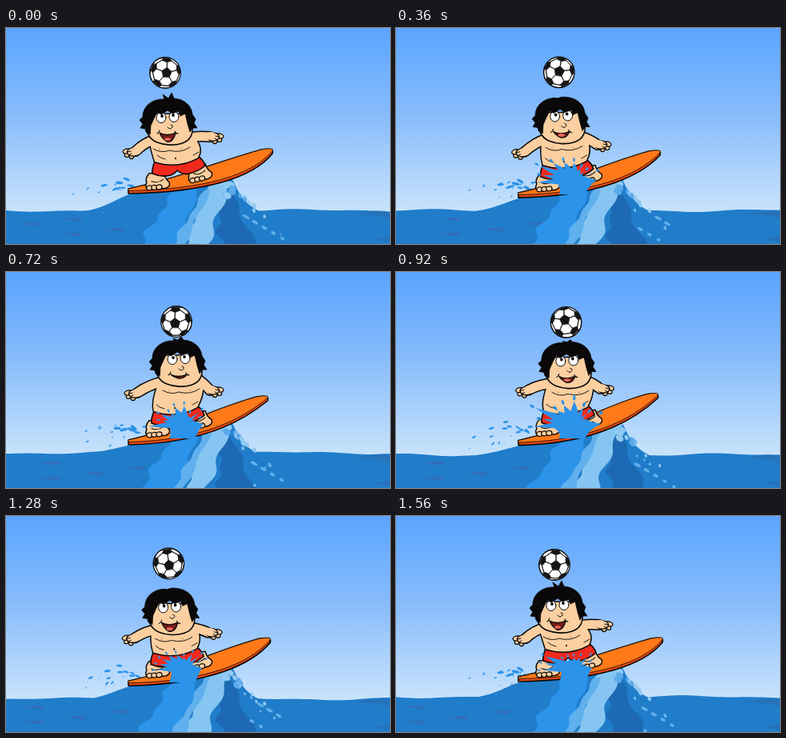
These frames come from a looping animation (480x270 px, 1.6 s). An HTML page with a canvas:

```html
<!DOCTYPE html>
<html lang="en">
<head>
<meta charset="utf-8">
<title>Surfing header</title>
<style>
html, body { margin: 0; width: 100%; height: 100%; overflow: hidden; }
canvas { display: block; }
</style>
</head>
<body>
<canvas width="480" height="270"></canvas>
<script>
const ctx = document.querySelector('canvas').getContext('2d');
const LOOP = 1600, STEP = 40, TAU = Math.PI * 2;
const SKIN = '#fbcfa0', INK = '#0a0808', SEA = '#207dca', WATER = '#2b93ea', FOAM = '#86c5f2', DEEP = '#1d69b3';
const { sin, cos, floor, hypot } = Math;

// Tracks: values at key times, joined by periodic Hermite curves.
const poseTimes = [0, 200, 520, 720, 1120, 1400, 1560];
const ballTimes = [0, 90, 200, 240, 400, 520, 640, 720, 840, 980, 1120, 1190, 1360, 1400, 1460, 1560];
const ballX = [199, 199, 199, 200, 205, 208, 211, 213, 213, 212, 209, 207, 200, 199, 198, 198];
const ballY = [56, 46.5, 66, 70, 52, 57, 68, 62, 54, 68, 53, 49, 70, 71, 71, 61];
const pose = {
  headX: [204, 203, 212, 216, 212, 203, 204],
  headY: [115, 114, 113, 112, 117, 117, 115],
  lookX: [-1, -1, 2, 1, -1, -1, -1],
  tuft: [6, 0, 0, 3, 0, 0, 6],
  mouth: [9, 10, 1, 3, 8, 9, 9],
  handLX: [159, 156, 160, 161, 163, 155, 159],
  handLY: [155, 158, 153, 152, 147, 158, 154],
  handRX: [259, 256, 257, 259, 259, 256, 258],
  handRY: [136, 146, 145, 148, 144, 146, 136],
  hipX: [217, 215, 215, 216, 216, 215, 218],
  hipY: [173, 177, 177, 180, 178, 175, 172],
  footY: [194, 194, 198, 198, 195, 193, 193],
  tailY: [203, 205, 211, 212, 212, 205, 203],
  noseX: [333, 333, 327, 327, 328, 332, 333],
  noseY: [152, 155, 153, 156, 150, 156, 153],
  boardW: [1, 1, .6, .45, .8, 1, 1],
  sea: [228, 231, 225, 226, 230, 227, 226],
  splash: [0, 1, .4, .65, 1, .3, .6]
};

function track(times, values, t) {
  const n = times.length;
  const T = k => times[(k + n) % n] + LOOP * floor(k / n);
  const V = k => values[(k + n) % n];
  const slope = k => (V(k + 1) - V(k - 1)) / (T(k + 1) - T(k - 1));
  let i = n - 1;
  while (times[i] > t) i--;
  const d = T(i + 1) - T(i), u = (t - T(i)) / d, s = u * u * (3 - 2 * u);
  return V(i) * (1 - s) + V(i + 1) * s + d * u * (1 - u) * (slope(i) * (1 - u) - slope(i + 1) * u);
}

const rand = n => { const v = sin(n * 127.1 + 3.7) * 43758.5453; return v - floor(v); };

function shape(d, fill, line = 0) {
  const p = new Path2D(d);
  if (fill) { ctx.fillStyle = fill; ctx.fill(p); }
  if (line) { ctx.strokeStyle = INK; ctx.lineWidth = line; ctx.stroke(p); }
}

function oval(x, y, rx, ry, fill, line = 0, turn = 0) {
  ctx.beginPath();
  ctx.ellipse(x, y, rx, ry, turn, 0, TAU);
  ctx.fillStyle = fill;
  ctx.fill();
  if (line) { ctx.strokeStyle = INK; ctx.lineWidth = line; ctx.stroke(); }
}

function limb(d, width, color) {
  ctx.strokeStyle = color;
  ctx.lineWidth = width;
  ctx.stroke(new Path2D(d));
}

function at(x, y, draw) {
  ctx.save();
  ctx.translate(x, y);
  draw();
  ctx.restore();
}

// Ragged band of water running down from (x0, y0) to the bottom edge.
function stream(x0, y0, x1, w0, w1, rag, turns, color, t) {
  const left = [], right = [];
  for (let y = y0; y <= 274; y += 3) {
    const u = (y - y0) / (274 - y0), c = x0 + (x1 - x0) * u, w = w0 + (w1 - w0) * u;
    const ph = y / 7 - t / LOOP * TAU * turns;
    left.push([c - w + rag * u * sin(ph) + rag * .5 * sin(ph * 2 + 1), y]);
    right.unshift([c + w + rag * sin(ph * 1 + 2) * (.4 + u * .6), y]);
  }
  shape('M' + left.concat(right).join('L') + 'Z', color);
}

function drawSea(p, t) {
  const wave = x => p.sea + 1.3 * sin(x / 34 - t / LOOP * TAU * 2) + .7 * sin(x / 15 + t / LOOP * TAU);
  let d = 'M0,270';
  for (let x = 0; x <= 480; x += 6) d += `L${x},${wave(x)}`;
  shape(d + 'L480,270Z', SEA);
  shape(`M90,${p.sea + 2} C128,${p.sea - 2} 140,${p.tailY + 7} 162,${p.tailY + 3} L280,185
    C290,198 291,222 330,${p.sea + 6} L330,270 90,270Z`, SEA);

  const drift = t / LOOP * 60;
  for (let i = 0; i < 4; i++) {
    const x = 25 + (i * 53 + 60 - drift + 160) % 160, y = 239 + i * 13 % 20;
    shape(`M${x - 15},${y} Q${x},${y - 4} ${x + 13},${y - 1} Q${x + 5},${y + 1} ${x + 9},${y + 3} Q${x - 5},${y + 1} ${x - 15},${y}Z`, '#316fba');
  }
  shape('M436,233 Q460,226 480,230 L480,239 Q466,233 436,233Z M462,264 L480,260 480,268Z', '#2672ba');
}

function drawWake(t) {
  stream(274, 206, 290, 8, 22, 5, 5, DEEP, t);
  stream(226, 200, 192, 14, 26, 5, 4, WATER, t);
  stream(268, 190, 236, 14, 14, 5, 4, FOAM, t);
  stream(252, 202, 214, 4, 7, 3, 4, '#60b0ee', t);
  for (let i = 0; i < 16; i++) {
    const u = (t / 400 + rand(i)) % 1, v = rand(i + 40);
    const x = 275 + u * (20 + 55 * v), y = 194 + 18 * v + u * u * 50 - u * 12 * (1 - v);
    oval(x, y, (1 - u) * 4 + 1.5, (1 - u) * 3 + 1, i % 3 ? '#91caf2' : '#5baaea', 0, .5 + u);
  }
  for (let i = 0; i < 5; i++) {
    const u = (t / 800 + i / 5) % 1;
    oval(300 + i * 9 + u * 12, 236 + u * 34, 5 - 3 * u, 1.8, '#62b0eb', 0, .5);
  }
}

function drawSpray(t) {
  for (let i = 0; i < 18; i++) {
    const u = (t / 400 + rand(i + 9)) % 1, a = rand(i + 70), b = rand(i + 120);
    const vx = -28 - 70 * a, vy = -14 - 38 * b;
    const x = 166 + vx * u, y = 201 + vy * u + 48 * u * u;
    const size = (1 - u * .6) * (1 + 2 * rand(i + 33));
    oval(x, y, size * 2.1, size * .8, WATER, 0, Math.atan2(vy + 96 * u, vx));
  }
}

function drawSplash(s, t) {
  if (s < .08) return;
  const cx = 222, cy = 190;
  for (let i = 0; i < 9; i++) {
    const a = Math.PI + i / 8 * 2.7 - .1, reach = s * (24 + 30 * rand(i + floor(t / 200) * 9) + (i < 3 ? 18 : 0));
    const x = cx + cos(a) * reach, y = cy + sin(a) * reach * .65, w = 4 + 3 * s;
    const nx = -sin(a) * w, ny = cos(a) * w;
    shape(`M${cx + nx},${cy + ny} Q${(cx + x) / 2 + nx},${(cy + y) / 2 - 3} ${x},${y}
      Q${(cx + x) / 2 - nx},${(cy + y) / 2 + 4} ${cx - nx},${cy - ny}Z`, WATER);
    oval(x + cos(a) * 5, y + sin(a) * 4, 3.5 * s, 1.8 * s, WATER, 0, a);
  }
  shape(`M${cx - 26 * s},196 Q${cx - 10},${190 - 8 * s} ${cx + 3},${188 - 7 * s} Q${cx + 20 * s},186 ${cx + 38 * s},190
    Q${cx + 20},196 ${cx + 14},208 L${cx - 18},208 Q${cx - 15},200 ${cx - 26 * s},196Z`, WATER);
}

function drawBoard(p) {
  const x = 153, y = p.tailY, nx = p.noseX, ny = p.noseY;
  const outline = lift => `M${x},${y - 2} C${x + 65},${y - 16} ${nx - 80},${ny + 19} ${nx - 14},${ny}
    Q${nx + 3},${ny - 3} ${nx},${ny + 5 - lift}
    C${nx - 22},${ny + 15 + 17 * p.boardW - lift} ${x + 105},${y + 2 - lift} ${x},${y + 4 - lift}Z`;
  shape(outline(0), '#e8490f', 1.6);
  shape(outline(3.5), '#ff7918', .8);
}

function drawFoot(x, y, turn) {
  at(x, y, () => {
    ctx.rotate(turn);
    shape('M-9,-13 Q-15,-7 -13,-2 Q-17,4 -11,7 L10,7 Q17,5 15,0 Q10,-5 10,-12Z', SKIN, 1.5);
    for (let i = 0; i < 3; i++) oval(-10 + i * 6, 5, 3.6, 3, SKIN, 1.2);
    shape('M-7,-3 Q0,1 8,-4', null, 1);
  });
}

function drawHand(x, y, side) {
  at(x, y, () => {
    ctx.scale(side, 1);
    oval(7, 3, 4, 3, SKIN, 1.3, .6);
    oval(8, -1, 5, 3, SKIN, 1.3, .2);
    oval(2, 5, 3, 3.5, SKIN, 1.3);
    oval(0, 0, 7.5, 5.2, SKIN, 1.3);
    oval(-3, -1, 6.5, 5, SKIN);
    shape('M3,-1 L8,0 M2,2 L6,4', null, 1);
  });
}

function drawBody(p) {
  const { headX: x, headY: y, hipX: hx, hipY: hy, handLX: lx, handLY: ly, handRX: rx, handRY: ry } = p;
  drawFoot(189, p.footY, -.08);
  drawFoot(242, p.footY - 10.5, -.22);
  at(hx, hy, () => shape(`M-31,-6 Q-35,3 -34,9 Q-22,14 -11,11 Q-6,9 -3,5 Q4,11 12,9
    Q24,6 32,-1 Q29,-10 22,-13 Q-4,0 -31,-6Z`, '#ef2a1c', 1.6));

  const torso = `M${x - 24},${y + 17} C${x - 25},${y + 30} ${hx - 35},${hy - 20} ${hx - 31},${hy - 6}
    Q${hx - 2},${hy + 3} ${hx + 23},${hy - 11} C${hx + 30},${hy - 24} ${x + 34},${y + 26} ${x + 27},${y + 15}Z`;
  const arms = `M${x - 19},${y + 25} Q${(x + lx) / 2 - 8},${(y + ly) / 2 + 8} ${lx + 3},${ly - 1}
    M${x + 24},${y + 22} Q${(x + rx) / 2 + 10},${(y + ry) / 2 + 9} ${rx - 4},${ry}`;
  limb(arms, 14, INK);
  shape(torso, SKIN, 3);
  limb(arms, 11, SKIN);
  shape(torso, SKIN);
  shape(`M${x - 20},${y + 36} Q${x - 10},${y + 42} ${x},${y + 38} Q${x + 14},${y + 42} ${x + 26},${y + 34}
    M${hx - 28},${hy - 14} Q${hx - 24},${hy - 10} ${hx - 18},${hy - 9} M${hx + 24},${hy - 18} L${hx + 17},${hy - 14}`, null, .9);
  oval(hx - 5, hy - 10, .9, 1.3, INK);
  oval(x - 12, y + 36, 1, .8, '#c57f58');
  oval(x + 14, y + 36, 1, .8, '#c57f58');
  drawHand(lx, ly, -1);
  drawHand(rx, ry, 1);
}

function drawHead(p) {
  at(p.headX, p.headY, () => {
    shape('M-25,-8 C-28,2 -31,12 -25,20 C-17,34 18,35 26,22 C32,14 28,2 25,-8Z', SKIN, 1.6);
    at(p.lookX, 0, () => {
      oval(-9, -3, 6, 6.5, '#fff', 1);
      oval(7, -4, 6, 6.5, '#fff', 1);
      oval(-8, -5, 1.8, 2.1, INK);
      oval(6, -6, 1.8, 2.1, INK);
      shape('M-1,9 Q2,13 5,9 Q6,6 3,6', SKIN, 1);
      shape(`M-11,16 Q-2,21 9,16 Q6,${18 + p.mouth * 1.2} -2,${18 + p.mouth} Q-8,${17 + p.mouth * .7} -11,16Z`, '#7a1d18', 1.3);
      if (p.mouth > 5) oval(-1, 15 + p.mouth, 4, 1.8, '#e8695c');
      shape('M-14,17 Q-12,16 -11,13 M8,14 Q9,17 12,17', null, 1.1);
    });
    const k = p.tuft;
    shape(`M-24,18 L-29,15 -30,11 -36,10 -33,5 -37,0 -33,-4 C-33,-18 -20,-27 -6,-26
      L${-6 - k / 3},${-26 - k} -1,-27 ${3},${-28 - k} 6,-27 C20,-26 28,-17 29,-7 L33,-1 31,4 35,10 29,10 26,15
      L23,5 20,-8 14,-5 12,-11 4,-8 -2,-12 -10,-7 -15,-10 -19,-2 -23,7Z`, INK, .8);
  });
}

// Icosahedron corners; cutting them gives the football's panels.
const corners = [[0, 0, 1], [0, 0, -1]];
for (let i = 0; i < 5; i++) {
  const a = -TAU / 4 + i * TAU / 5, r = 2 / Math.sqrt(5);
  corners.push([r * cos(a), r * sin(a), r / 2], [-r * cos(a), -r * sin(a), -r / 2]);
}
const dot = (a, b) => a[0] * b[0] + a[1] * b[1] + a[2] * b[2];

function drawBall(x, y, t) {
  const R = 19.3, roll = .18 * sin(t / LOOP * TAU + .4), tilt = .2 * sin(t / LOOP * TAU * 2), turn = .1 * cos(t / LOOP * TAU);
  const spin = ([a, b, c]) => {
    [a, b] = [a * cos(roll) - b * sin(roll), a * sin(roll) + b * cos(roll)];
    [b, c] = [b * cos(tilt) - c * sin(tilt), b * sin(tilt) + c * cos(tilt)];
    return [a * cos(turn) + c * sin(turn), b, c * cos(turn) - a * sin(turn)];
  };
  const pts = corners.map(spin);
  const panelCorner = (v, w) => {
    const q = v.map((n, i) => 2 * n + w[i]), len = hypot(...q);
    const flat = q[2] < 0 ? hypot(q[0], q[1]) : len;
    return [q[0] / flat * R, q[1] / flat * R];
  };
  at(x, y, () => {
    oval(0, 0, R, R, '#fff');
    ctx.save();
    ctx.clip();
    for (const v of pts) {
      if (v[2] < -.5) continue;
      const near = pts.filter(w => w !== v && dot(v, w) > .4);
      const u = near[0].map((n, i) => n - v[i] * dot(near[0], v));
      const s = [v[1] * u[2] - v[2] * u[1], v[2] * u[0] - v[0] * u[2], v[0] * u[1] - v[1] * u[0]];
      const angle = w => Math.atan2(dot(w, s), dot(w, u));
      near.sort((a, b) => angle(a) - angle(b));
      shape('M' + near.map(w => panelCorner(v, w)).join('L') + 'Z', '#151515', .6);
      for (const w of near) if (v[2] + w[2] > 0) shape(`M${panelCorner(v, w)}L${panelCorner(w, v)}`, null, .8);
    }
    ctx.restore();
    ctx.beginPath();
    ctx.arc(0, 0, R, 0, TAU);
    ctx.strokeStyle = INK;
    ctx.lineWidth = 1.2;
    ctx.stroke();
  });
}

const sky = ctx.createLinearGradient(0, 0, 0, 235);
sky.addColorStop(0, '#5aa4ff');
sky.addColorStop(.45, '#86bbfc');
sky.addColorStop(1, '#cbe5fb');
ctx.lineJoin = ctx.lineCap = 'round';

function frame() {
  const t = floor(performance.now() % LOOP / STEP) * STEP, p = {};
  for (const name in pose) p[name] = track(poseTimes, pose[name], t);
  ctx.fillStyle = sky;
  ctx.fillRect(0, 0, 480, 270);
  drawSea(p, t);
  drawWake(t);
  drawSpray(t);
  drawBoard(p);
  drawBody(p);
  drawHead(p);
  drawSplash(p.splash, t);
  drawBall(track(ballTimes, ballX, t), track(ballTimes, ballY, t), t);
  requestAnimationFrame(frame);
}
frame();
</script>
</body>
</html>
```
